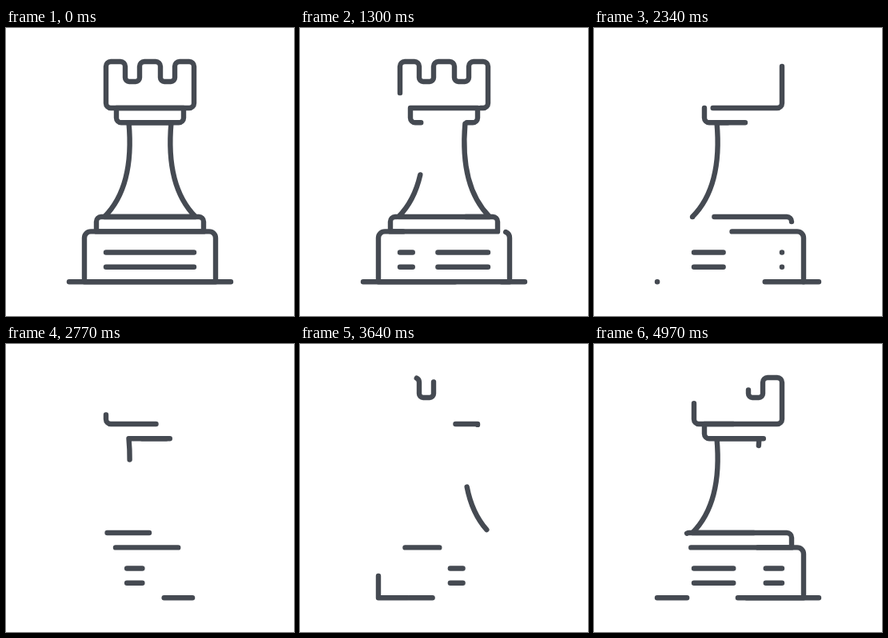
Write an HTML page with a canvas that moves like this. It is 360x360 px and loops after 5010 ms.

```html
<!DOCTYPE html>
<html lang="en">
<head>
<meta charset="utf-8">
<title>Chess rook</title>
<style>
  html, body { margin: 0; width: 100%; height: 100%; overflow: hidden; background: #fff; }
  canvas { display: block; width: 360px; height: 360px; }
</style>
</head>
<body>
<canvas id="stage"></canvas>
<script>
const SIZE = 360;
const LOOP = 5010;
const STEP = LOOP / 150;
const RAMP = 1036;       // ms of acceleration
const SPEED = 0.000183;  // progress per ms after the ramp

const arc = (r, sweep, dx, dy) => `a${r} ${r} 0 0 ${sweep} ${dx} ${dy}`;
const notch = `${arc(6, 1, 6, 6)}v14${arc(5, 0, 5, 5)}h8${arc(5, 0, 5, -5)}v-14${arc(6, 1, 6, -6)}`;

// Each outline begins where its trim begins.
const outlines = [
  // crown
  `M235 48V94${arc(6, 1, -6, 6)}H131${arc(6, 1, -6, -6)}V48${arc(6, 1, 6, -6)}` +
    `h12${notch}h14${notch}h12${arc(6, 1, 6, 6)}z`,
  // collar
  `M138 100v12.2${arc(6, 0, 6, 6)}h72${arc(6, 0, 6, -6)}v-12.2z`,
  // neck
  'M123 236C149 210 158 168 153.5 118.2H206.5C202 168 211 210 237 236z',
  // tier
  `M247 242${arc(6, 0, -6, -6)}H119${arc(6, 0, -6, 6)}V254.4H247z`,
  // block
  `M262 317.3V262.4${arc(8, 0, -8, -8)}H106${arc(8, 0, -8, 8)}V317.3z`,
  // ground and the two engraved lines
  'M281 317.3H79',
  'M125 280.5H235',
  'M125 298.7H235'
];

function measure(d) {
  const el = document.createElementNS('http://www.w3.org/2000/svg', 'path');
  el.setAttribute('d', d);
  return el.getTotalLength();
}

const shapes = outlines.map(d => ({ path: new Path2D(d), length: measure(d) }));

const canvas = document.getElementById('stage');
const ctx = canvas.getContext('2d');
const ratio = window.devicePixelRatio || 1;
canvas.width = canvas.height = SIZE * ratio;
ctx.scale(ratio, ratio);

function progress(t) {
  return t < RAMP ? SPEED * t * t / (2 * RAMP) : SPEED * (t - RAMP / 2);
}

// Lines shrink to nothing at half progress, then grow, while the trim keeps rotating.
function draw(t) {
  const p = progress(t);
  const start = p < 0.5 ? 3 * p : 1 + p;
  const shown = Math.abs(1 - 2 * p);

  ctx.fillStyle = '#fff';
  ctx.fillRect(0, 0, SIZE, SIZE);
  ctx.strokeStyle = '#454a52';
  ctx.lineWidth = 6.4;
  ctx.lineCap = ctx.lineJoin = 'round';

  for (const { path, length } of shapes) {
    ctx.setLineDash(shown < 1 ? [shown * length, (1 - shown) * length] : []);
    ctx.lineDashOffset = -(start % 1) * length;
    ctx.stroke(path);
  }
}

function tick() {
  const t = performance.now() % LOOP;
  const step = Math.min(149, Math.floor(t / STEP + 0.25));
  draw(step * STEP);
  requestAnimationFrame(tick);
}

tick();
</script>
</body>
</html>
```
